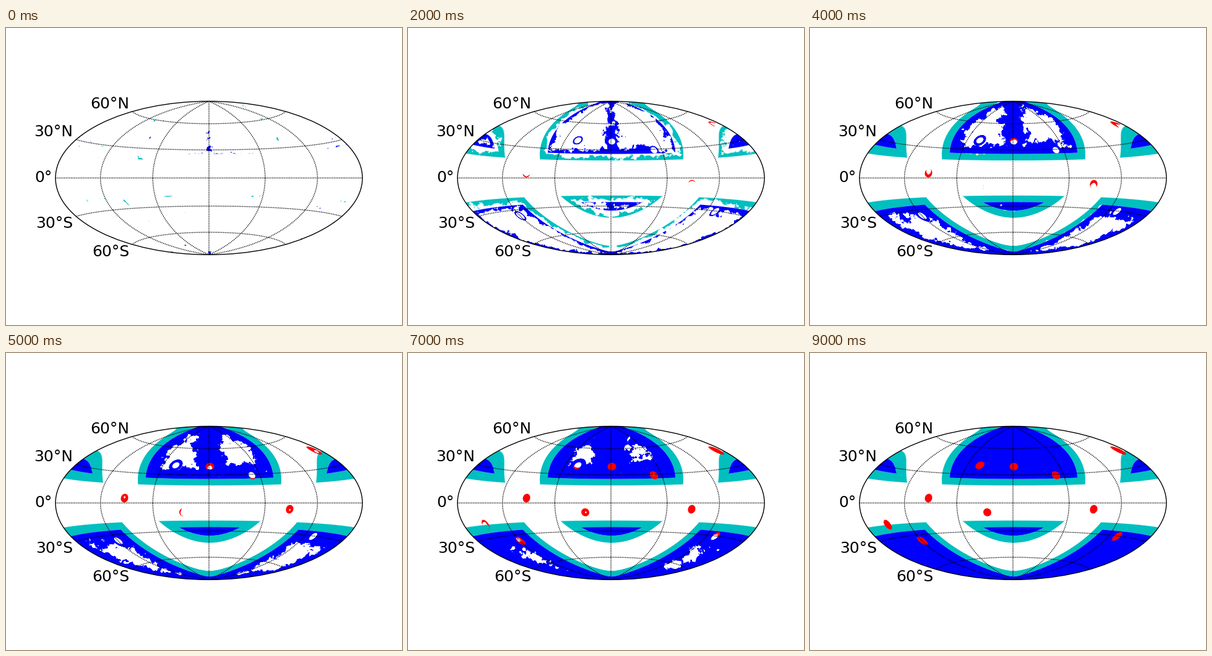
Animation of 640 by 480 pixels, one loop 10 s. Source, as a matplotlib script:

```python
import numpy as np
import matplotlib.pyplot as plt
from matplotlib.animation import FuncAnimation
from matplotlib.patches import Ellipse

W, H, DPI = 640, 480, 100
CX, CY, RX, RY = 328, 242.4, 248, 124      # map ellipse
X0, X1, Y0, Y1 = 78, 578, 117, 368         # painted window
STEPS = 10
DONE = 8.5                                 # every gap is closed after this step
POLE_LAT = np.radians(29.8)                # pole of the tilted plane, on the central meridian
OUTER = (18.6, 17.2)                       # least distance from equator and tilted plane
INNER = (25.6, 25.2)
CYAN, BLUE, RED = (0, .75, .75), (0, 0, 1), (1, 0, 0)
DOT_R = np.radians(4.2)

# x, y, first step, side that fills first (degrees, clockwise from right)
DOTS = [
    (191, 234, .5, 90), (498, 157, .8, 200), (458, 252, 1.2, 270), (329, 183, 2.6, 270),
    (286, 257, 3.8, 180), (397, 197, 4.7, 90), (181, 303, 5, 0), (125, 277, 5.8, 300),
    (274, 181, 6, 110), (496, 296, 6.5, 300),
]

X, Y = np.meshgrid(np.arange(X0, X1, dtype=float), np.arange(Y0, Y1, dtype=float))
rng = np.random.default_rng(12)


def soft(v):
    return np.clip(v + .5, 0, 1)


def noise(*parts):
    """Sum of smooth random fields given as (weight, blur radius)."""
    fy = np.fft.fftfreq(X.shape[0])[:, None]
    fx = np.fft.fftfreq(X.shape[1])[None, :]
    total = 0
    for weight, sigma in parts:
        f = np.fft.fft2(rng.standard_normal(X.shape))
        g = np.fft.ifft2(f * np.exp(-2 * (np.pi * sigma) ** 2 * (fx ** 2 + fy ** 2))).real
        total = total + weight * g / g.std()
    return total


def hammer(lon, lat):
    lon, lat = np.radians(lon), np.radians(lat)
    d = np.sqrt(1 + np.cos(lat) * np.cos(lon / 2))
    return CX + RX * np.cos(lat) * np.sin(lon / 2) / d, CY - RY * np.sin(lat) / d


def sky(px, py):
    """Unit vectors on the sphere for map pixels."""
    u = (px - .5 - CX) / RX * 2 * np.sqrt(2)
    v = (CY - py - .5) / RY * np.sqrt(2)
    z = np.sqrt(np.maximum(1 - (u / 4) ** 2 - (v / 2) ** 2, .5))
    lon = 2 * np.arctan2(z * u, 2 * (2 * z * z - 1))
    lat = np.arcsin(np.clip(z * v, -1, 1))
    return np.array([np.cos(lat) * np.cos(lon), np.cos(lat) * np.sin(lon), np.sin(lat)])


def degrees_off(sine):
    return np.degrees(np.arcsin(np.clip(np.abs(sine), 0, 1)))


def build():
    """Layers as (step at which each pixel appears, coverage, colour)."""
    vec = sky(X, Y)
    rho = np.hypot((X + .5 - CX) / RX, (Y + .5 - CY) / RY)
    on_map = soft((1 - rho) * 130)

    off_equator = degrees_off(vec[2])
    off_plane = degrees_off(vec[0] * np.cos(POLE_LAT) + vec[2] * np.sin(POLE_LAT))
    off_meridian = degrees_off(vec[1])
    outer, inner = (np.minimum(off_equator - a, off_plane - b) for a, b in (OUTER, INNER))
    in_cover = soft(inner * 1.6)

    # zones grow from their borders, blue also from the central great circle
    rough = noise((.6, 2.2), (.5, 4.5), (.35, .9), (.5, 14))
    cyan = .9 + .3 * np.maximum(outer, 0) + .5 * noise((.6, 2), (.5, 5), (.3, .9), (.5, 14))
    depth = np.maximum(np.minimum(inner, off_meridian), 0)
    blue = 1.1 + .33 * depth + (.65 + .03 * depth) * rough

    # spots fill from one side of the rim; blue rings them early
    red = np.full(X.shape, 99.)
    red_cover, hole = np.zeros(X.shape), np.ones(X.shape)
    for x, y, start, side in DOTS:
        cosine = np.tensordot(sky(np.float64(x), np.float64(y)), vec, 1)
        s = np.arccos(np.clip(cosine, -1, 1)) / DOT_R
        turn = np.arctan2(Y - y, X - x) - np.radians(side)
        fill = .4 * (1 - s * np.cos(turn)) + .6 * (1 - s)
        span = 5 - start / 2
        red = np.where(s < 1.3, start + span * fill + .2 * rough, red)
        red_cover = np.maximum(red_cover, soft((1 - s) * 6))
        hole = np.minimum(hole, soft((s - .8) * 6))
        blue = np.minimum(blue, 1.5 + 7 * np.maximum(s - 1.05, 0))

    return [
        (np.minimum(cyan, DONE), soft(outer * 1.6) * (1 - in_cover) * on_map, CYAN),
        (np.minimum(blue, DONE), in_cover * hole * on_map, BLUE),
        (np.minimum(red, DONE), red_cover * on_map, RED),
    ]


LAYERS = build()


def paint(step):
    img = np.ones(X.shape + (3,))
    for when, cover, color in LAYERS:
        a = (cover * soft((step - when) * 2.5))[..., None]
        img = img * (1 - a) + np.array(color) * a
    return img


fig = plt.figure(figsize=(W / DPI, H / DPI), dpi=DPI, facecolor="white")
ax = fig.add_axes([0, 0, 1, 1])
picture = ax.imshow(paint(0), extent=(X0, X1, Y1, Y0), interpolation="nearest",
                    aspect="auto")
ax.set_xlim(0, W)
ax.set_ylim(H, 0)
ax.axis("off")

grid = dict(color="black", lw=1, dashes=(1, 1), dash_capstyle="butt")
for lon in range(-120, 121, 60):
    ax.plot(*hammer(lon, np.linspace(-90, 90, 1801)), **grid)
for lat in range(-60, 61, 30):
    x, y = hammer(np.linspace(-180, 180, 3601), lat)
    ax.plot(x, np.broadcast_to(y, x.shape), **grid)
    name = f"{abs(lat)}°" + ("N" if lat > 0 else "S" if lat < 0 else "")
    va = "bottom" if lat > 0 else "top" if lat < 0 else "center"
    ax.text(x[0] - RX / 50, y[0], name, ha="right", va=va, fontsize=18,
            family="DejaVu Sans")
ax.add_patch(Ellipse((CX, CY), 2 * RX, 2 * RY, fill=False, ec="black", lw=1, zorder=3))


def update(step):
    picture.set_data(paint(step))
    return [picture]


anim = FuncAnimation(fig, update, frames=STEPS, interval=1000, repeat=True,
                     repeat_delay=0, init_func=lambda: update(0), blit=False)
plt.show()
```
